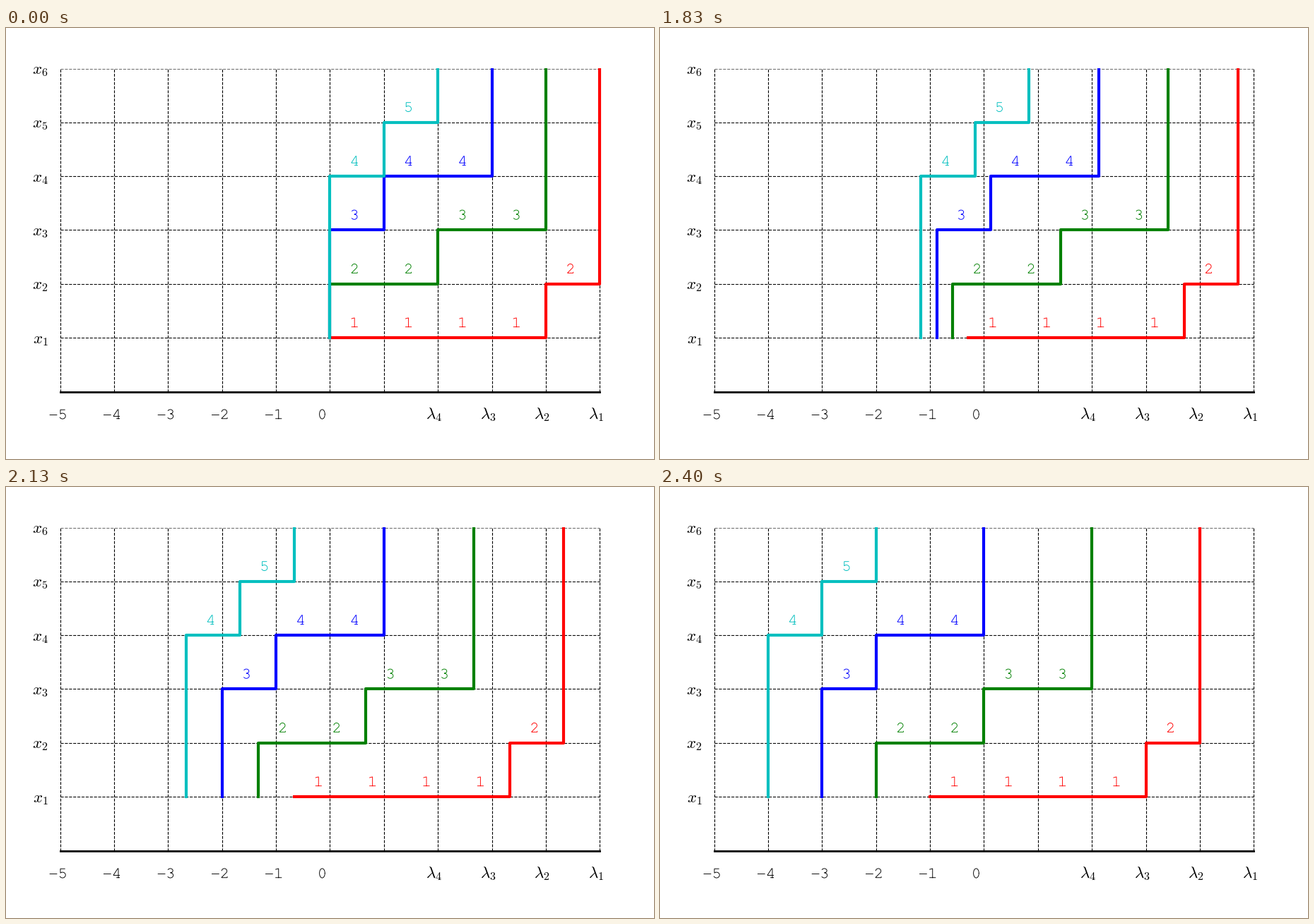
Animation, 917 px wide and 611 px high, one loop 4.03 s. Source, as a matplotlib script:

```python
import numpy as np
import matplotlib.pyplot as plt
from matplotlib.animation import FuncAnimation
from matplotlib.patches import PathPatch
from matplotlib.path import Path
from matplotlib.transforms import Affine2D

W, H, DPI = 917, 611, 100
UNIT = H / 8                          # cell size in pixels
X0, Y0 = 458.45, H - 1.25 * UNIT      # lattice origin in pixels
TOP = 57                              # everything is cut off above this row
EM = 22.2                             # size of the typewriter digits
PX = 72 / DPI

TICK = 10                             # ms per frame
FRAMES = 403
START, STEPS = 163, 24                # first moving frame, steps of the slide

plt.rcParams["mathtext.fontset"] = "cm"


def px(x):
    return X0 + UNIT * x


def py(y):
    return Y0 - UNIT * y


def arc(cx, cy, rx, ry, start, stop):
    a = np.radians(np.linspace(start, stop, 40))
    return list(zip(cx + rx * np.cos(a), cy + ry * np.sin(a)))


# Thin typewriter digits as strokes, in thousandths of an em
BASE = 21
GLYPHS = {
    "-": [[(80, 257), (520, 257)]],
    "0": [arc(300, 303, 174, 298, 0, 360)],
    "1": [[(117, BASE), (484, BASE)], [(300, BASE), (300, 598), (117, 548)]],
    "2": [arc(265, 440, 168, 161, 170, -35)
          + [(92, 35), (92, BASE), (451, BASE), (451, 72)]],
    "3": [arc(258, 466, 165, 135, 150, -90) + arc(258, 168, 187, 162, 90, -145)],
    "4": [[(300, BASE), (480, BASE)],
          [(404, BASE), (404, 601), (368, 601), (99, 190), (99, 170), (480, 170)]],
    "5": [[(430, 586), (147, 586), (147, 320)]
          + arc(285, 186, 190, 180, 135, -150)],
}


def label_path(text, cx, cy):
    """Strokes of a string, its ink centred on a pixel position."""
    strokes = [Path(np.array(s) + (600 * i, 0))
               for i, ch in enumerate(text) for s in GLYPHS[ch]]
    path = Path.make_compound_path(*strokes)
    box = path.get_extents()
    mid = (box.x0 + box.x1) / 2
    k = EM / 1000
    return Affine2D().translate(-mid, -303).scale(k, -k).translate(cx, cy) \
        .transform_path(path)


def add_digits(paths, color):
    patch = PathPatch(Path.make_compound_path(*paths), fill=False, edgecolor=color,
                      lw=0.92 * PX, snap=False, joinstyle="miter",
                      capstyle="projecting", zorder=5)
    ax.add_patch(patch)
    return patch


fig = plt.figure(figsize=(W / DPI, H / DPI), dpi=DPI, facecolor="white")
ax = fig.add_axes([0, 0, 1, (H - TOP) / H])
ax.set_xlim(0, W)
ax.set_ylim(H, TOP)
ax.axis("off")
ax.set_autoscale_on(False)

# Lattice
for x in range(-5, 6):
    ax.plot([px(x)] * 2, [py(0), py(6)], "k--", lw=0.8, zorder=1)
for y in range(1, 6):
    ax.plot([px(-5), px(5)], [py(y)] * 2, "k--", lw=0.8, zorder=1)
ax.plot([px(-5), px(5)], [TOP + 0.7] * 2, "--", color="0.45", lw=0.8, zorder=1)
ax.plot([px(-5), px(5)], [py(0)] * 2, "k-", lw=2, zorder=2)

# Axis labels
LABEL_Y = 547.5
labels = [label_path(str(n), px(n) - 3.4, LABEL_Y) for n in range(-5, 0)]
labels.append(label_path("0", px(0) - 11, LABEL_Y))
add_digits(labels, "k")
math_style = dict(size=16.5, ha="center", va="baseline", clip_on=False)
for i in range(1, 5):
    ax.text(px(6 - i) - 5.7, 554, rf"$\lambda_{i}$", **math_style)
for i in range(1, 7):
    ax.text(48.5, py(i) + 7.8, f"$x_{i}$", **math_style)

# Each lattice path: colour and the heights of its east steps
WALKS = [("r", [1, 1, 1, 1, 2]),
         ("g", [2, 2, 3, 3]),
         ("b", [3, 4, 4]),
         ("c", [4, 5])]


def walk_points(rows):
    xs, ys = [0], [1]
    for x, row in enumerate(rows):
        if row != ys[-1]:
            xs.append(x)
            ys.append(row)
        xs.append(x + 1)
        ys.append(row)
    return xs + [len(rows)], ys + [6]


walks = []
for speed, (color, rows) in enumerate(WALKS, 1):
    xs, ys = walk_points(rows)
    line, = ax.plot([px(x) for x in xs], [py(y) for y in ys], color=color,
                    lw=3, zorder=3)
    digits = add_digits([label_path(str(r), px(x + 0.455), py(r) - 21.7)
                         for x, r in enumerate(rows)], color)
    walks.append((speed, xs, line, digits))


def progress(frame):
    """Share of the slide done: steps of 1/24, three every 100 ms."""
    if frame < START:
        return 0
    return min(1 + 3 * (frame - START) // 10, STEPS) / STEPS


def update(frame):
    t = progress(frame)
    artists = []
    for speed, xs, line, digits in walks:
        line.set_xdata([px(x - speed * t) for x in xs])
        digits.set_transform(Affine2D().translate(-speed * t * UNIT, 0) + ax.transData)
        artists += [line, digits]
    return artists


anim = FuncAnimation(fig, update, frames=FRAMES, interval=TICK, repeat=True,
                     repeat_delay=0, init_func=lambda: update(0))
plt.show()
```
